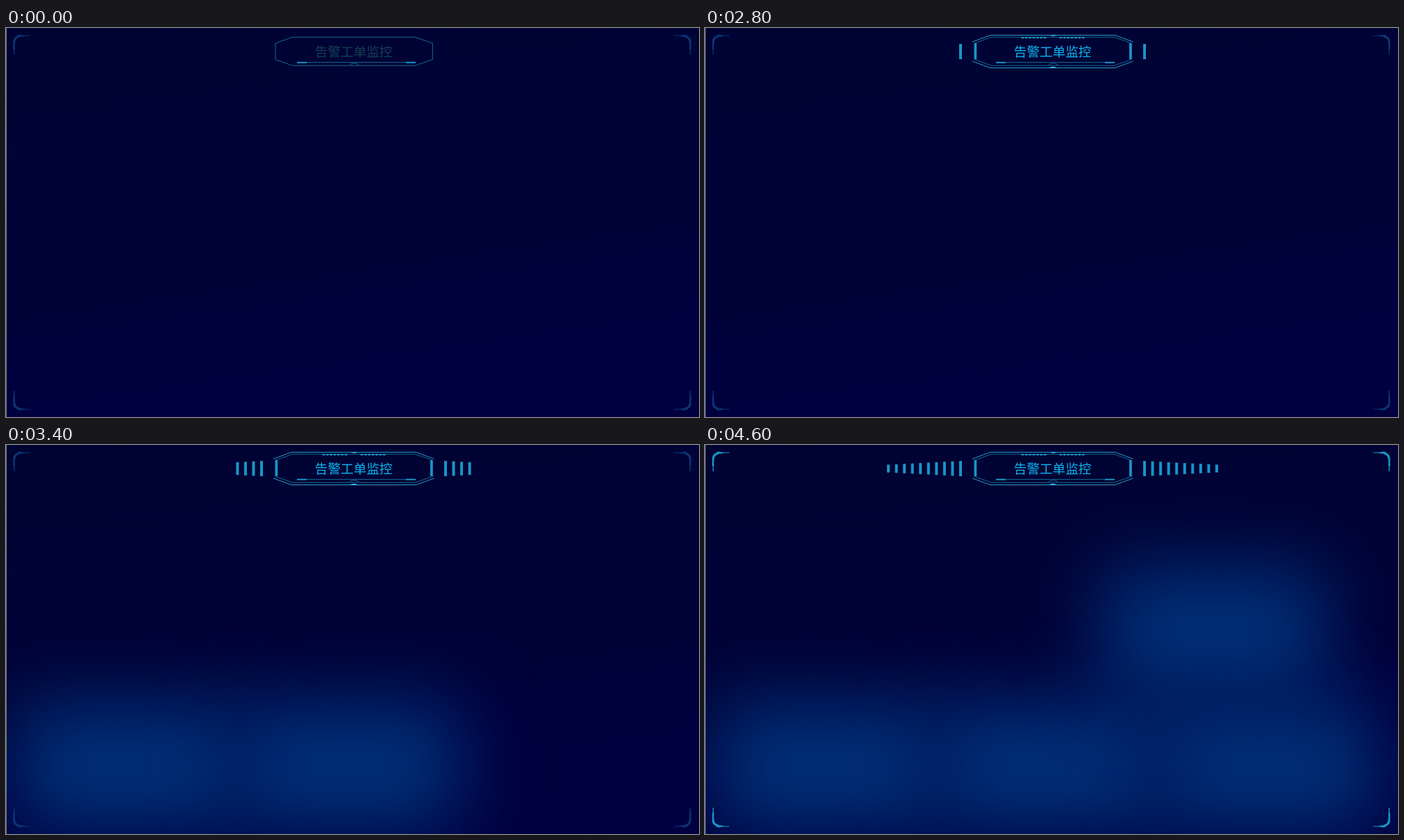
These frames come from a looping animation (998 by 561 pixels, 9.6 s). An HTML page:

```html
<!DOCTYPE html>
<html lang="zh">
<head>
<meta charset="utf-8">
<title>告警工单监控</title>
<style>
  html, body { margin: 0; width: 100%; height: 100%; overflow: hidden; }
  #stage {
    position: absolute; left: 0; top: 0; width: 998px; height: 561px; overflow: hidden;
    background: linear-gradient(172deg, #000433 0%, #000238 60%, #00003d 68%, #010040 100%);
  }
  .glow {
    position: absolute; width: 320px; height: 180px; margin: -90px 0 0 -160px;
    background: #003079; filter: blur(55px);
  }
  svg { position: absolute; left: 0; top: 0; }
  .title { font: 400 18.6px "Noto Sans CJK SC", "Noto Sans CJK", sans-serif; text-anchor: middle; }
</style>
</head>
<body>
<div id="stage"></div>
<script>
const LOOP = 9600;
const BLUE = '#1a94c6';
const stage = document.getElementById('stage');

// Hard switch of one property at a given time of the loop
function flip(el, prop, from, to, at) {
  const offset = at / LOOP;
  el.animate([
    { [prop]: from, offset: 0 }, { [prop]: from, offset },
    { [prop]: to, offset }, { [prop]: to, offset: 1 }
  ], { duration: LOOP, iterations: Infinity });
}
const showAt = (el, at) => flip(el, 'opacity', 0, 1, at);

function glow(x, y, at) {
  const el = document.createElement('div');
  el.className = 'glow';
  el.style.left = x + 'px';
  el.style.top = y + 'px';
  stage.append(el);
  showAt(el, at);
}

function add(parent, tag, attrs) {
  const el = document.createElementNS('http://www.w3.org/2000/svg', tag);
  for (const key in attrs) el.setAttribute(key, attrs[key]);
  parent.append(el);
  return el;
}
const bar = (parent, x, y, width, height) =>
  add(parent, 'rect', { x, y, width, height, fill: BLUE });
const line = (parent, d, stroke, width) =>
  add(parent, 'path', { d, fill: 'none', stroke, 'stroke-width': width });

glow(174, 463, 3000);
glow(490, 463, 3400);
glow(806, 463, 3800);
glow(732, 268, 4600);

const svg = add(stage, 'svg', { width: 998, height: 561 });
add(svg, 'rect', { width: 1, height: 561, fill: '#69718c' });

// Corner brackets
const corner = 'M35 10.4 L24 10.4 21.5 9.4 17.5 9.8 15 12 12 14 10.4 17.5 10.2 29 11 31 11 38 ' +
  'H12.4 V32 L13 29 12.6 25 13.4 19 15 15.5 18 14 20 12.4 24 12.6 28 11.6 35 11.4Z';
for (const sx of [1, -1]) for (const sy of [1, -1]) {
  const el = add(svg, 'path', {
    d: corner,
    transform: `translate(${sx < 0 ? 997 : 0} ${sy < 0 ? 561 : 0}) scale(${sx} ${sy})`
  });
  flip(el, 'fill', '#0b3474', BLUE, 4600);
}

// Inner frame
line(svg, 'M388 22 412.5 13.2H589L614.3 22V45.5L589 54.2H412.5L388 45.5Z', '#1a86ac', 0.8);
line(svg, 'M419 49.6H590', '#1a86ac', 0.8);
line(svg, 'M495 53 Q501.5 48.5 508 53', '#1a86ac', 0.8);
line(svg, 'M419 49.7H433M576 49.7H590', BLUE, 2);

// Outer frame
const outer = add(svg, 'g', {});
line(outer, 'M385 20 411 10.4H590.5L616.5 20M385 48 411 57.5H590.5L616.5 48', '#2a9fcb', 1);
add(outer, 'path', { d: 'M496 10H507Q501.5 13.5 496 10ZM494.5 58Q501 53.5 507.5 58Z', fill: '#39c0ea' });
showAt(outer, 1000);

const posts = add(svg, 'g', {});
bar(posts, 387.8, 22, 3.5, 23);
bar(posts, 611, 22, 3.5, 23);
showAt(posts, 1200);

[[455.5, 1400], [510.5, 1600]].forEach(([x, at]) => {
  const el = add(svg, 'path', {
    d: `M${x} 14H${x + 36}`, stroke: BLUE, 'stroke-width': 2, 'stroke-dasharray': '3.9 1.45'
  });
  showAt(el, at);
});

const title = add(svg, 'text', { x: 500.6, y: 40.7, class: 'title' });
title.textContent = '告警工单监控';
flip(title, 'fill', '#143f55', '#0db4f2', 1800);

// Bars spreading out to both sides
for (let i = 0; i < 10; i++) {
  const pair = add(svg, 'g', {});
  const dx = 11.55 * i, dy = 0.6 * i;
  for (const x of [366 - dx, 631 + dx]) bar(pair, x, 23 + dy, 4, 22 - 2 * dy);
  showAt(pair, 2800 + 200 * i);
}
</script>
</body>
</html>
```
